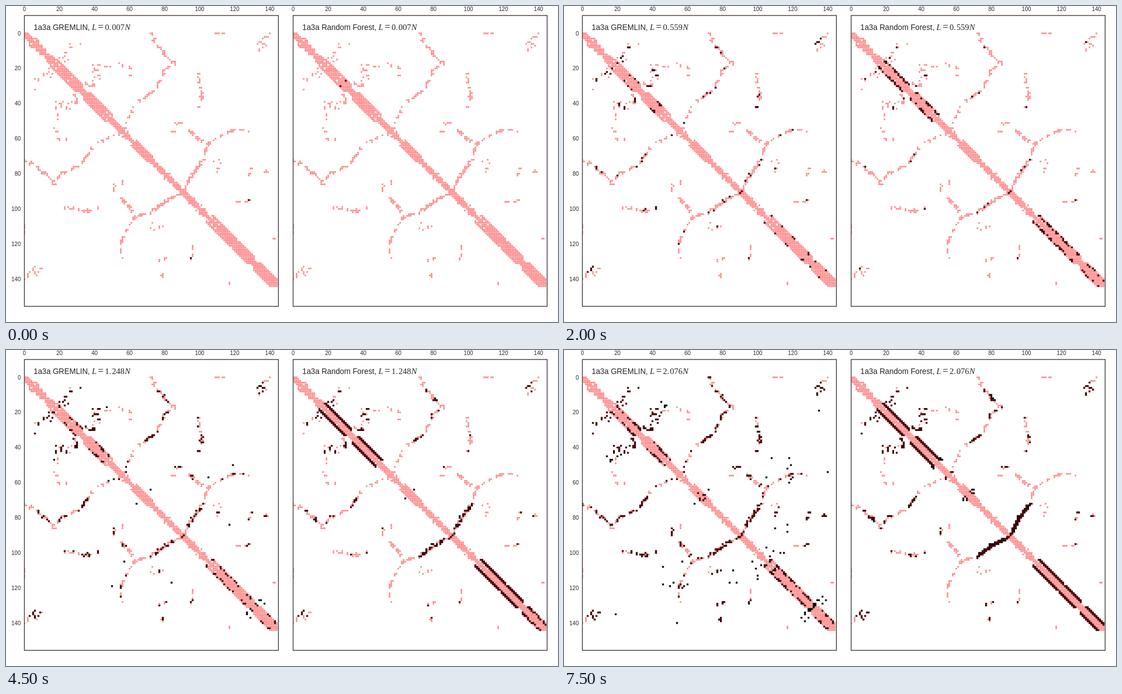
These frames come from a looping animation (990x566 px, 8000 ms). An HTML page:

```html
<!DOCTYPE html>
<html lang="en">
<head>
<meta charset="utf-8">
<title>Contact map</title>
<style>
  html, body { margin: 0; width: 100%; height: 100%; overflow: hidden; background: #fff; }
  svg { display: block; }
  text { fill: #262626; font-family: "Liberation Sans", Arial, sans-serif; }
  .tick { font-size: 10px; }
  .title { font-size: 13.75px; }
  .math { font: 15px "Liberation Serif", Times, serif; }
  .var { font-style: italic; }
  .sign { font-size: 18px; }
</style>
</head>
<body>
<svg id="stage" width="990" height="566" viewBox="0 0 990 566"></svg>
<script>
const LENGTH = 145, CELL = 3.143, STEP_MS = 500, STEPS = 16;
const TOP = 17, WIDTH = 455.5, HEIGHT = 521, ORIGIN = 49;
const contacts = new Map();
const predicted = [new Map(), new Map()];

const noise = (a, b) => {
  const v = Math.sin(a * 12.9898 + b * 78.233) * 43758.5453;
  return v - Math.floor(v);
};
const key = ([i, j]) => i * 200 + j;
const shuffle = points => points.sort((a, b) => noise(...a) - noise(...b));

// Ragged pairs along a line through the given corners; keep is the part left standing.
function trail(keep, fill, ...corners) {
  const points = [];
  for (let n = 1; n < corners.length; n++) {
    const [i0, j0] = corners[n - 1], [i1, j1] = corners[n];
    const count = Math.max(Math.abs(i1 - i0), Math.abs(j1 - j0));
    for (let s = 0; s < count; s++) {
      const i = Math.round(i0 + (i1 - i0) * s / count);
      const j = Math.round(j0 + (j1 - j0) * s / count);
      if (noise(i + 2, j) > keep) continue;
      points.push([i, j]);
      if (noise(i, j + 3) < fill) points.push([i + 1, j]);
      if (noise(i + 5, j) < fill) points.push([i, j + 1]);
      if (noise(i, j + 8) < fill / 2) points.push([i - 1, j]);
    }
  }
  return shuffle(points);
}

// Loose pairs in a box around a centre, some of them doubled.
function cloud(count, [i, j], [di, dj], twins = .4) {
  const points = [];
  const spread = (centre, reach, seed) => Math.round(centre + reach * (2 * noise(seed, i + j) - 1));
  for (let n = 1; n <= count; n++) {
    const p = [spread(i, di, n), spread(j, dj, n + 40)];
    points.push(p);
    if (noise(...p) < twins) points.push([p[0] + 1, p[1]]);
  }
  return points;
}

function helixEdge(from, to) {
  const points = [];
  for (let j = from; j <= to - 3; j++) {
    points.push([j + 3, j]);
    if (j + 4 <= to) points.push([j + 4, j]);
  }
  return shuffle(points);
}

// The points appear in order between two steps; share is the part that appears at all.
function predict(panel, points, [start, end, share = 1]) {
  points.forEach((p, n) => {
    if (noise(p[0] + .5, p[1] + panel) >= share) return;
    const step = Math.ceil(start + (end - start) * n / Math.max(1, points.length - 1));
    const old = predicted[panel].get(key(p));
    if (old === undefined || step < old.step) predicted[panel].set(key(p), { p, step });
  });
}

function contact(points, left, right) {
  points.forEach(p => contacts.set(key(p), p));
  if (left) predict(0, points, left);
  if (right) predict(1, points, right);
}

// Diagonal
for (let j = 0; j < LENGTH; j++) {
  for (let d = 0; d < 4 && j + d < LENGTH; d++) {
    if (d < 2 || noise(j, d) < (d === 2 ? .85 : .15)) contact([[j + d, j]]);
  }
}

// Helices
contact(helixEdge(3, 8));
contact(helixEdge(15, 33), [.6, 13, .6], [.3, 7]);
contact(helixEdge(34, 50), [.6, 14, .5], [.3, 8]);
contact(helixEdge(62, 73).filter(([i, j]) => i - j < 4));
contact(helixEdge(104, 121), [2, 14, .5], [.3, 7]);
contact(helixEdge(119, 131), [2, 13, .45], [.3, 9]);
contact(helixEdge(131, 144), [1, 14, .35], [.3, 13]);
predict(1, [[30, 27]], [0, 0]);

// Strand pairs
contact(trail(.5, .35, [84, 19], [79, 21], [78, 25], [75, 31]), [2, 15, .6], [6, 19, .4]);
contact(trail(.85, .45, [73, 33], [70, 35], [68, 38]), [1, 11, .8], [1, 15, .9]);
contact(trail(.6, .3, [66, 38], [62, 42], [60, 46], [58, 51]), [7, 20, .35]);
contact(trail(.8, .4, [58, 51], [56, 55]), [4, 13, .6], [7, 14, .7]);
contact(trail(.6, .3, [105, 62], [103, 68], [102, 72]), [7, 18, .4]);
contact(trail(.85, .4, [102, 72], [98, 77], [95, 82], [92, 87], [90, 91]), [1, 14, .65], [3, 13]);
predict(1, trail(1, .8, [101, 73], [96, 79], [91, 89]), [6, 14]);
contact(trail(.9, .5, [93, 54], [97, 58], [102, 62]), [2, 20, .25]);
contact(trail(.6, .4, [73, 0], [75, 6]), [8, 20, .4]);
contact(trail(.9, .4, [76, 7], [82, 14]), [.6, 12, .6], [2, 13, .5]);
contact(trail(.7, .4, [82, 14], [87, 18]), [5, 15, .4], [14, 24]);
predict(1, trail(1, .7, [79, 10], [82, 14]), [5, 12]);

// Sparse arcs
contact(trail(.4, .3, [96, 17], [99, 24], [101, 30], [101, 38], [99, 43]), [1, 17, .8], [2, 24, .4]);
contact(trail(.4, .3, [105, 63], [112, 58], [121, 54], [129, 56]), [2, 20, .5], [8, 28, .4]);

// Around the first two helices
contact(cloud(7, [22, 12], [3, 4]), [.6, 9], [3, 14]);
contact(cloud(4, [29, 8], [3, 3]), [.6, 10], [4, 16]);
contact(cloud(9, [41, 22], [3, 4]), [.6, 11], [2, 16]);
contact(cloud(8, [37, 29], [3, 2]), [2, 13], [4, 17]);
contact(cloud(5, [51, 18], [7, 2]));
contact(cloud(3, [60, 22], [0, 4]));

// Far contacts
contact([[128, 95]], [0, 0], [3, 3]);
contact(cloud(5, [124, 96], [5, 1]), [5, 30]);
contact(cloud(10, [135, 7], [3, 4], .2), [.6, 13], [3, 17]);
contact(cloud(3, [139, 3], [3, 3]));
contact(cloud(4, [109, 0], [4, 0]));
contact(cloud(4, [129, 79], [2, 2]), [5, 14], [8, 22]);
contact(cloud(3, [138, 78], [2, 1]), [5, 14], [8, 22]);
contact(cloud(4, [87, 51], [2, 1]), [5, 14], [8, 22]);
contact(cloud(3, [84, 57], [1, 2]));
contact(cloud(5, [109, 75], [4, 4]), [4, 18]);
contact(cloud(4, [143, 116], [1, 2]));

// Predictions that are not contacts
predict(0, cloud(6, [68, 66], [3, 3]), [7, 14, .6]);
predict(0, cloud(12, [112, 52], [10, 13], 0), [8, 18]);
predict(0, cloud(16, [111, 97], [9, 14], 0), [9, 18]);
predict(0, cloud(10, [135, 128], [6, 4], .2), [2, 15]);
predict(0, cloud(7, [44, 18], [4, 5], 0), [9, 16]);
predict(0, [[140, 54], [135, 19]], [14, 15]);
predict(1, cloud(4, [69, 65], [1, 1]), [9, 15]);
predict(1, cloud(4, [52, 47], [2, 1]), [8, 15]);

// Drawing
const SVG = "http://www.w3.org/2000/svg";
const stage = document.getElementById("stage");

function add(parent, tag, attributes, text) {
  const node = document.createElementNS(SVG, tag);
  for (const name in attributes) node.setAttribute(name, attributes[name]);
  if (text !== undefined) node.textContent = text;
  return parent.appendChild(node);
}

const square = (i, j, size) => {
  const x = i * CELL - size / 2, y = ORIGIN - TOP + j * CELL - size / 2;
  return `M${x.toFixed(2)} ${y.toFixed(2)}h${size}v${size}h${-size}z`;
};
const squares = (points, size) =>
  points.map(([i, j]) => square(i, j, size) + (i === j ? "" : square(j, i, size))).join("");

function makePanel(x, name, mathX, calls) {
  const plot = add(stage, "svg", { x, y: TOP, width: WIDTH, height: HEIGHT });
  add(plot, "path", { fill: "#ff8888", d: squares([...contacts.values()], 2.8) });
  const hits = add(plot, "path", { fill: "#460000" });
  const misses = add(plot, "path", { fill: "#080808" });
  add(stage, "rect", { x, y: TOP, width: WIDTH, height: HEIGHT, fill: "none", stroke: "#262626", "stroke-width": 1.25 });

  for (let n = 0; n <= 140; n += 20) {
    add(stage, "text", { class: "tick", x: x + n * CELL, y: 9, "text-anchor": "middle" }, n);
  }
  add(stage, "text", { class: "title", x: x + 16.5, y: 43 }, `1a3a ${name},`);
  const math = (dx, text, kind = "") =>
    add(stage, "text", { class: `math ${kind}`, x: mathX + dx, y: 43 }, text);
  math(0, "L", "var");
  math(11, "=", "sign");
  const whole = math(23.5, ""), decimals = math(36, "");
  math(59, "N", "var");

  return step => {
    const shown = [...calls.values()].filter(c => c.step <= step).map(c => c.p);
    hits.setAttribute("d", squares(shown.filter(p => contacts.has(key(p))), 3.3));
    misses.setAttribute("d", squares(shown.filter(p => !contacts.has(key(p))), 3.3));
    const [a, b] = ((1 + 20 * step) / LENGTH).toFixed(3).split(".");
    whole.textContent = a + ".";
    decimals.textContent = b;
  };
}

const panels = [
  makePanel(33, "GREMLIN", 154, predicted[0]),
  makePanel(515, "Random Forest", 668, predicted[1])
];
for (let n = 0; n <= 140; n += 20) {
  add(stage, "text", { class: "tick", x: 26.5, y: ORIGIN + n * CELL + 3.5, "text-anchor": "end" }, n);
}

const start = performance.now();
let current = -1;
function frame() {
  const step = Math.floor((performance.now() - start) / STEP_MS) % STEPS;
  if (step !== current) {
    current = step;
    panels.forEach(update => update(step));
  }
  requestAnimationFrame(frame);
}
frame();
</script>
</body>
</html>
```
